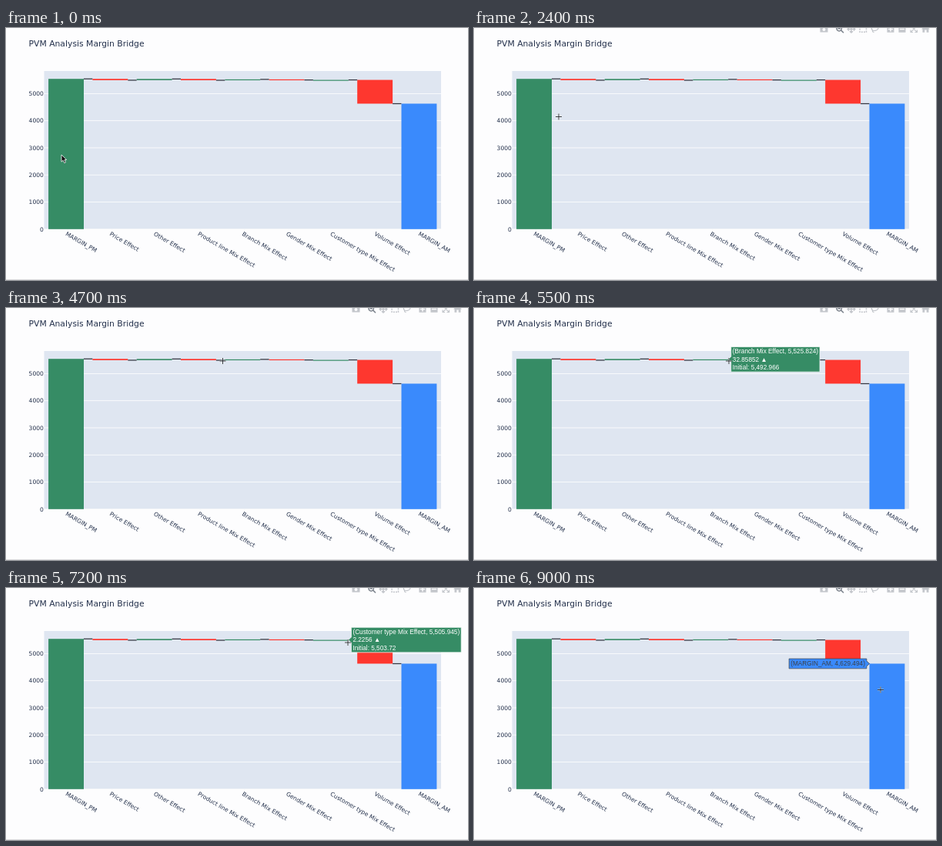
Write an HTML page that moves like this. It is 600 by 328 pixels and loops after 9100 ms.

```html
<!DOCTYPE html>
<html lang="en">
<head>
<meta charset="utf-8">
<title>PVM Analysis Margin Bridge</title>
<style>
  html, body { margin: 0; width: 100%; height: 100%; overflow: hidden; background: #fdfdfe; }
  svg { display: block; width: 600px; height: 328px; }
  .label { font: 7.55px "DejaVu Sans", sans-serif; fill: #222f4a; }
  .title { font-size: 10.8px; }
  .tip { font: 8.25px "Liberation Sans", Arial, sans-serif; white-space: pre; }
</style>
</head>
<body>
<svg id="stage" viewBox="0 0 600 328"></svg>
<script>
const LOOP = 9100, STEP = 100;
const GREEN = '#368c65', RED = '#fe372f', BLUE = '#3a8afc';
const PITCH = 57.3, BAR = 45.9;
const stage = document.getElementById('stage');

function add(parent, tag, attrs, text) {
  const node = document.createElementNS('http://www.w3.org/2000/svg', tag);
  for (const key in attrs) node.setAttribute(key, attrs[key]);
  if (text) node.textContent = text;
  return parent.appendChild(node);
}
const rect = (x, y, width, height, fill) => add(stage, 'rect', { x, y, width, height, fill });
const yOf = v => 261.8 - v * 0.03528;
const leftOf = i => 55.1 + i * PITCH;
const num = v => v.toLocaleString('en-US', { maximumFractionDigits: 3 });

// name, start, end, time the hover label shows, time it hides
const bars = [
  ['MARGIN_PM', 0, 5544.183, 2000, 2400],
  ['Price Effect', 5544.183, 5495.216, 2700, 3100],
  ['Other Effect', 5495.216, 5541.374, 3100, 3600],
  ['Product line Mix Effect', 5541.374, 5492.966, 4000, 4700],
  ['Branch Mix Effect', 5492.966, 5525.824, 4800, 5700],
  ['Gender Mix Effect', 5525.824, 5503.72, 5800, 6600],
  ['Customer type Mix Effect', 5503.72, 5505.945, 6700, 7400],
  ['Volume Effect', 5505.945, 4629.494, 7500, 8300],
  ['MARGIN_AM', 0, 4629.494, 8400, LOOP]
];
const deltas = { 4: '32.85852', 6: '2.2256' };
const last = bars.length - 1;
const colorOf = (i, from, to) => i === last ? BLUE : to > from ? GREEN : RED;

function drawChart() {
  rect(0, 327, 600, 1, '#dcdcde');
  rect(49.5, 56, 515.5, 206, '#dfe6f1');
  add(stage, 'text', { x: 29.5, y: 24.3, class: 'label title' }, 'PVM Analysis Margin Bridge');
  for (let v = 0; v <= 5000; v += 1000) {
    rect(49.5, yOf(v) - 0.4, 515.5, v ? 0.8 : 1.2, '#fff');
    add(stage, 'text', { x: 48.8, y: yOf(v) + 2.7, class: 'label', 'text-anchor': 'end' }, String(v));
  }
  bars.forEach(([name, from, to], i) => {
    const x = leftOf(i), y = yOf(Math.max(from, to));
    rect(x, y, BAR, Math.max(1.2, yOf(Math.min(from, to)) - y), colorOf(i, from, to));
    if (i < last) rect(x + BAR, yOf(to) - 0.6, PITCH - BAR, 1.25, '#333640');
    add(stage, 'text', {
      class: 'label', transform: `translate(${x + 21.6} 269.6) rotate(30)`
    }, name);
  });
}

function drawModebar() {
  const bar = add(stage, 'g', { fill: 'none', stroke: '#c3c6cb', 'stroke-width': 1.5 });
  const icon = (x, d, extra) => add(bar, 'path', { d, transform: `translate(${x} 1.5)`, ...extra });
  const solid = { fill: '#c3c6cb', stroke: 'none' };
  icon(454.5, 'M-5-3H5V4H-5ZM-2 .5a2 2 0 1 0 4 0a2 2 0 1 0-4 0', { ...solid, 'fill-rule': 'evenodd' });
  icon(475, 'M-4-.8a3.2 3.2 0 1 0 6.4 0a3.2 3.2 0 1 0-6.4 0M1.6 1.4L5 4.7M-2.4-.8H.8', { stroke: '#7d838d' });
  icon(490, 'M-4.5 0H4.5M0-4.5V4.5M-2 2.8L0 4.6L2 2.8M-3-2L-4.8 0L-3 2M3-2L4.8 0L3 2');
  icon(505.3, 'M-4.2-4V3.8H4.2V-4', { 'stroke-dasharray': '2 1.2' });
  icon(520.5, 'M-2.5 2C-6-1-3-5 1-5S6 0 2 1.5S-3 .5-3 2.5S-1 3-1.5 4.5', { 'stroke-width': 1.2 });
  const box = 'M-4.5-4.5H4.5V4.2H-4.5Z';
  icon(541, box + 'M-3-.8V.8H-.8V3H.8V.8H3V-.8H.8V-3H-.8V-.8Z', { ...solid, 'fill-rule': 'evenodd' });
  icon(556, box + 'M-3-.8V.8H3V-.8Z', { ...solid, 'fill-rule': 'evenodd' });
  icon(571.3, 'M-4.2 1V4H-1.2M1.2 4H4.2V1M-3.5 3.3L3.5-3.7M3.5 3.3L-3.5-3.7', { 'stroke-width': 1.2 });
  icon(586.5, 'M-5.5 0L0-5L5.5 0H4V4.3H1.2V1H-1.2V4.3H-4V0Z', solid);
  return bar;
}

function makeTip([name, from, to], i) {
  const total = i === 0 || i === last, up = to > from, flip = i === last;
  const ink = flip ? '#3c4148' : '#fff';
  const lines = [`(${name}, ${num(to)})`];
  if (!total) {
    const d = deltas[i] || Math.abs(to - from).toPrecision(7);
    lines.push(up ? d + ' ▲' : `(${d}) ▼`, 'Initial: ' + num(from));
  }
  const y = yOf(to), half = total ? 6.4 : 16.3, dir = flip ? -1 : 1;
  const tipX = flip ? leftOf(i) : leftOf(i) + BAR;
  const g = add(stage, 'g', {});
  const shape = add(g, 'path', { fill: colorOf(i, from, to), stroke: ink, 'stroke-width': 0.7 });
  const texts = lines.map((s, n) => add(g, 'text', {
    class: 'tip', fill: ink, y: y + 2.9 + (n - (lines.length - 1) / 2) * 10.6
  }, s));
  const w = Math.max(...texts.map(t => t.getComputedTextLength())) + 4;
  const near = tipX + dir * 3.6, far = near + dir * w;
  texts.forEach(t => t.setAttribute('x', Math.min(near, far) + 2));
  shape.setAttribute('d', `M${tipX} ${y}L${near} ${y - 3.6}V${y - half}H${far}V${y + half}H${near}V${y + 3.6}Z`);
  return g;
}

drawChart();
const modebar = drawModebar();
const tips = bars.map(makeTip);
const arrow = add(stage, 'path', {
  d: 'M0 0V9.2L2.2 7.2L3.8 10.7L5.5 9.9L4 6.6H6.8Z', fill: '#111', stroke: '#fff', 'stroke-width': 0.8
});
const cross = add(stage, 'g', { fill: 'none' });
for (const [stroke, width] of [['#ffffffa0', 2], ['#22262c', 0.9]])
  add(cross, 'path', { d: 'M-4 0H4M0-4V4', stroke, 'stroke-width': width });

// time, x, y
const path = [
  [0, 72, 165], [600, 72, 165], [1100, 18, 269], [1400, 18, 269],
  [2400, 110, 115.5], [2800, 135, 69], [3400, 192, 69], [3900, 234, 72],
  [4400, 258, 69], [5000, 305, 69], [5500, 331, 69], [6100, 368, 69],
  [6300, 368, 69], [7200, 444, 71], [7800, 482, 88], [8300, 511, 112],
  [8600, 528, 132.5], [LOOP, 528, 132.5]
];
function pointer(t) {
  const k = path.findIndex(p => p[0] > t);
  const [t0, x0, y0] = path[k - 1], [t1, x1, y1] = path[k];
  const f = (t - t0) / (t1 - t0);
  return [x0 + (x1 - x0) * f, y0 + (y1 - y0) * f];
}
const show = (node, on) => node.setAttribute('visibility', on ? 'visible' : 'hidden');

function render(time) {
  const t = Math.floor((time % LOOP) / STEP) * STEP;
  const [x, y] = pointer(t);
  const crossed = t > 1400 && x > 49.5 && y < 262;
  for (const node of [arrow, cross]) node.setAttribute('transform', `translate(${x} ${y})`);
  show(arrow, !crossed);
  show(cross, crossed);
  modebar.setAttribute('opacity', Math.max(0, Math.min(1, (t - 1400) / 300)));
  tips.forEach((tip, i) => show(tip, t >= bars[i][3] && t < bars[i][4]));
}

const start = performance.now();
function tick() {
  render(performance.now() - start);
  requestAnimationFrame(tick);
}
tick();
</script>
</body>
</html>
```
